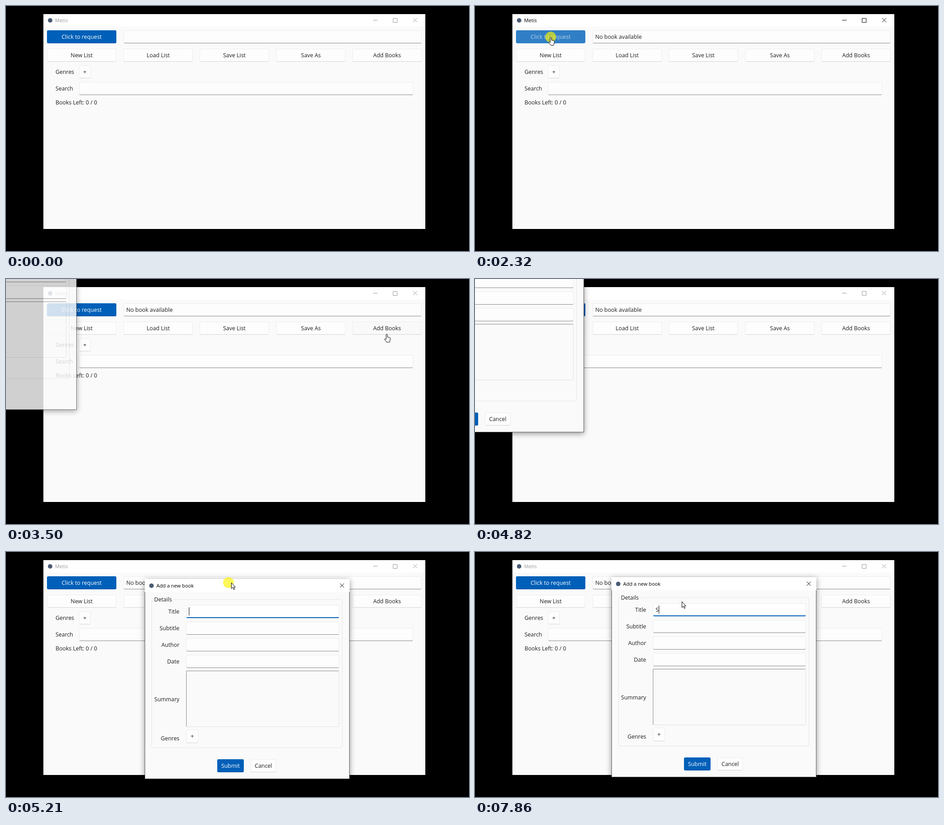
An HTML page for the animation above (8000 ms loop, 1028 by 545 pixels).

```html
<!DOCTYPE html>
<html lang="en">
<head>
<meta charset="utf-8">
<title>Book list</title>
<style>
  html, body { margin: 0; width: 100%; height: 100%; overflow: hidden; background: #000; }
  body { position: relative; font: 12.4px "Open Sans", "Noto Sans", sans-serif; color: #1c1c1c; cursor: default; }
  div, svg { position: absolute; box-sizing: border-box; white-space: pre; }
  svg { overflow: visible; }
  .window { background: #fafafa; }
  .bar { background: #fff; font-size: 11.1px; color: #000; }
  .inactive > .bar { color: #999; }
  .bar path { fill: none; stroke: currentColor; }
  .icon { border-radius: 50%; background: #4b5b75; }
  .button, .entry { border: 1px solid #ececec; border-radius: 3px; background: #fdfdfd; }
  .button { text-align: center; border-bottom-color: #d2d2d2; }
  .button.hover { background: #f9f9f9; }
  .entry { padding-left: 5px; border-bottom-color: #868686; }
  .entry.focus { background: #fff; border-bottom: 2px solid #005fb8; }
  .accent { background: #005fb8; border-color: #005fb8 #005fb8 #00539f; color: #fff; }
  .accent.hover { background: #196ebf; border-color: #196ebf; }
  .accent.press { background: #307fc6; border-color: #307fc6; color: #b5d0ea; }
  .right { text-align: right; }
  .frame { border: 1px solid #e6e6e6; border-radius: 4px; }
  .legend { background: #fafafa; padding-left: 2px; }
  .summary { border: 1px solid #e0e0e0; border-top-color: #868686; border-left-color: #868686; border-radius: 2px; }
  .caret { background: #000; }
  .dialog { outline: 1px solid #5c5c5c; outline-offset: -1px; box-shadow: 0 3px 12px rgba(0,0,0,.42); }
  .dialog.inactive { outline-color: #a6a6a6; box-shadow: 0 2px 8px rgba(0,0,0,.32); }
  .halo { border-radius: 50%; background: rgba(252,243,0,.65); }
  .pointer path { fill: #fff; stroke: #000; stroke-linejoin: round; }
</style>
</head>
<body>
<script>
function add(parent, cls, x, y, w, h, text = '') {
  const el = document.createElement('div');
  el.className = cls;
  el.textContent = text;
  const border = /button|entry/.test(cls) ? 2 : 0;
  el.style.cssText = `left:${x}px;top:${y}px;width:${w}px;height:${h}px;line-height:${h - border}px`;
  parent.append(el);
  return el;
}

function makeWindow(cls, x, y, w, h, barHeight, title, controls) {
  const win = add(document.body, 'window ' + cls, x, y, w, h);
  const bar = add(win, 'bar', 0, 0, w, barHeight);
  add(bar, 'icon', 10, barHeight / 2 - 5, 10, 10);
  add(bar, '', 26, 0, 200, barHeight, title);
  bar.insertAdjacentHTML('beforeend', `<svg width="${w}" height="${barHeight}"><path d="${controls}"/></svg>`);
  return win;
}

// Main window
const main = makeWindow('main', 83, 18, 848, 478, 28, 'Metis',
  'M732 13.5h10M776.5 9.5h9v9h-9zM821 9l9 9m0-9l-9 9');
const request = add(main, 'button accent', 8, 36, 154, 29, 'Click to request');
const result = add(main, 'entry', 178, 36, 662, 29);
const buttons = ['New List', 'Load List', 'Save List', 'Save As', 'Add Books']
  .map((name, i) => add(main, 'button', Math.round(8 + i * 169.5), 77, 154, 29, name));
const addBooks = buttons[4];
add(main, '', 27, 114, 50, 29, 'Genres');
add(main, 'button', 79, 114, 26, 29, '+');
add(main, '', 27, 151, 50, 29, 'Search');
add(main, 'entry', 79, 151, 742, 29);
add(main, '', 27, 182, 120, 29, 'Books Left: 0 / 0');

// Dialog
const dialog = makeWindow('dialog', 0, 0, 455, 445, 29, 'Add a new book', 'M433.5 10l9 9m0-9l-9 9');
add(dialog, 'frame', 15, 45, 424, 331);
add(dialog, 'legend', 19, 38, 44, 15, 'Details');
const label = (y, text) => add(dialog, 'right', 0, y, 77, 29, text);
const fields = ['Title', 'Subtitle', 'Author', 'Date'].map((name, i) => {
  const y = 58 + Math.round(i * 37.1);
  label(y, name);
  return add(dialog, 'entry', 92, y, 340, 29);
});
const titleField = fields[0];
label(253, 'Summary');
add(dialog, 'summary', 92, 204, 340, 125);
label(340, 'Genres');
add(dialog, 'button', 92, 335, 27, 30, '+');
add(dialog, 'button accent', 161, 401, 59, 29, 'Submit');
add(dialog, 'button', 235, 401, 57, 29, 'Cancel');
const caret = add(dialog, 'caret', 98, 63, 1, 18);

// Pointer
const halo = add(document.body, 'halo', -12, -12, 24, 24);
const pointer = add(document.body, 'pointer', 0, 0, 0, 0);
pointer.innerHTML = `
  <svg width="10" height="17"><path d="M.5.5V13.5L3.6 10.7 5.7 15.6 7.7 14.8 5.6 10H9.4Z"/></svg>
  <svg width="15" height="20" style="left:-6px"><path d="M5 11V2a1.4 1.4 0 0 1 2.8 0V7l5 1.2q1.5.4 1.4 2l-.7 4.8-1 3.5H6.3L2 13q-1-1.6.4-2.2 1-.3 2.6 1.6z"/></svg>`;
const [arrow, hand] = pointer.children;

// Keyframes: time, x, y
const pointerPath = [
  [289, 2000, 2000], [290, 846, 519], [368, 600, 400], [446, 361, 291], [530, 361, 291],
  [840, 245, 160], [1071, 166, 76], [1149, 166, 76], [1383, 168, 69], [2399, 168, 69],
  [2555, 420, 90], [2711, 867, 122], [2867, 845, 122], [3570, 845, 122], [3648, 480, 80],
  [3726, 222, 44], [3804, 222, 44], [3882, 193, 8], [3960, 100, -60], [4742, -112, -146],
  [5444, 489, 64], [5600, 489, 64], [5680, 450, 45], [5760, 385, 20], [5835, 308, 2],
  [5913, 280, -40], [6225, 280, -40], [6303, 290, 2], [6381, 310, 20], [6459, 360, 50],
  [6537, 425, 85], [6615, 437, 100], [6850, 443, 110], [7006, 446, 110], [7085, 446, 110],
  [7240, 453, 110]];
const dialogPath = [
  [4742, -298, -154], [4820, -213, -104], [4898, -70, -42], [4976, 80, 4], [5054, 195, 34],
  [5132, 272, 52], [5210, 308, 60], [5288, 304, 57], [5366, 304, 57], [5444, 303, 56]];
const presses = [[1530, 1615], [2310, 2390], [3020, 3090], [4735, 5440], [6590, 6750]];

function along(path, t) {
  const i = path.findIndex(p => p[0] > t);
  if (i === 0) return path[0].slice(1);
  if (i < 0) return path[path.length - 1].slice(1);
  const [t0, x0, y0] = path[i - 1], [t1, x1, y1] = path[i];
  const f = (t - t0) / (t1 - t0);
  return [Math.round(x0 + (x1 - x0) * f), Math.round(y0 + (y1 - y0) * f)];
}

const move = (el, x, y) => el.style.transform = `translate(${x}px,${y}px)`;
const show = (el, on) => el.style.visibility = on ? 'visible' : 'hidden';
const within = (t, from, to) => t >= from && t < to;

function draw(time) {
  const t = 290 + 78.1 * Math.floor((time - 280) / 78.1);

  const [dx, dy] = along(dialogPath, t);
  const dragging = within(t, 4735, 5440);
  const [px, py] = dragging ? [dx + 186, dy + 8] : along(pointerPath, t);
  const pressed = presses.some(([from, to]) => within(t, from, to));
  const over = (x, y) => t < 4000 && within(px, x, x + 154) && within(py, y, y + 29);
  const overRequest = over(91, 54), overAdd = over(769, 95);

  main.classList.toggle('inactive', !within(t, 1530, 3400));
  request.classList.toggle('hover', overRequest);
  request.classList.toggle('press', overRequest && pressed);
  addBooks.classList.toggle('hover', overAdd);
  result.textContent = t > 1610 ? 'No book available' : '';

  const focused = !within(t, 6060, 6590);
  const typed = t >= 7860;
  move(dialog, dx, dy);
  dialog.style.opacity = Math.max(0, Math.min(1, (t - 3380) / 134));
  dialog.classList.toggle('inactive', !focused);
  titleField.classList.toggle('focus', focused);
  titleField.textContent = typed ? 'S' : '';
  caret.style.opacity = focused && !within(t, 5750, 6060) && !within(t, 7235, 7545) ? 1 : 0;
  caret.style.left = (typed ? 105 : 98) + 'px';

  move(pointer, px, py);
  move(halo, px, py);
  show(halo, pressed);
  show(hand, overRequest || overAdd);
  show(arrow, !(overRequest || overAdd));
}

function tick() {
  draw(performance.now() % 8000);
  requestAnimationFrame(tick);
}
tick();
</script>
</body>
</html>
```
